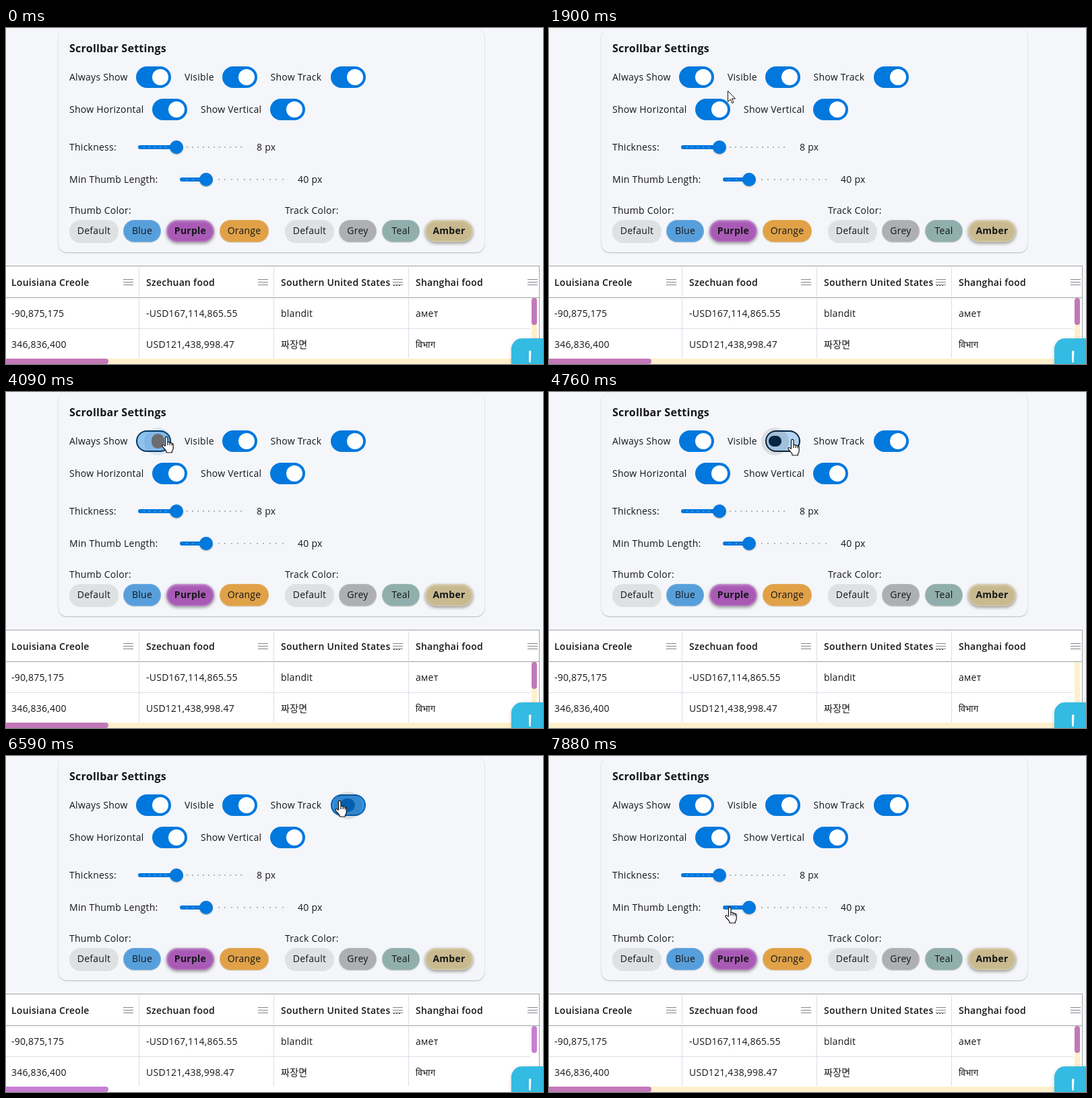
These frames come from a looping animation (797x499 px, 8 s). An HTML page:

```html
<!DOCTYPE html>
<html lang="en">
<head>
<meta charset="utf-8">
<title>Scrollbar settings</title>
<style>
html, body { margin: 0; width: 100%; height: 100%; overflow: hidden; }
body { background: #f4f6f9; }
#stage {
  position: absolute; left: 0; top: 0; width: 797px; height: 499px; overflow: hidden;
  background: #f4f6f9; color: #151618;
  font: 14px/20px "Open Sans", "Noto Sans", "Noto Sans CJK KR", "Noto Sans CJK", sans-serif;
  letter-spacing: .25px; white-space: pre;
}
#stage div, #stage span, #stage svg { position: absolute; box-sizing: border-box; }
#panel {
  left: 78px; top: 1px; width: 632px; height: 332px; border-radius: 12px;
  box-shadow: 0 1px 2px rgba(0,0,0,.24), 0 0 1px rgba(0,0,0,.08);
}
#stage .title { font-size: 16px; font-weight: 700; line-height: 24px; }
.head { font-weight: 600; }
.chip {
  top: 285px; height: 33px; border-radius: 16.5px; line-height: 32px; text-align: center;
  box-shadow: 0 1px 1px rgba(0,0,0,.14), inset 0 0 0 1px rgba(255,255,255,.16);
}
.chip.on {
  font-weight: 700;
  box-shadow: 0 2px 5px rgba(0,0,0,.4), inset 0 0 0 2px rgba(255,255,255,.16), inset 0 2px 4px rgba(255,255,255,.25);
}
.switch { width: 52px; height: 32px; }
.rail { inset: 0; border: 2px solid; border-radius: 16px; }
.halo { width: 41px; height: 41px; top: -4.5px; border-radius: 50%; }
.knob { border-radius: 12px; }
.fill { height: 6px; border-radius: 3px; background: #0078dd; }
.tick { width: 2px; height: 2px; border-radius: 1px; }
.ball {
  width: 20px; height: 20px; border-radius: 50%; background: #0078dd;
  box-shadow: 0 1px 2px rgba(0,0,0,.3);
}
.track { background: #fdf0cc; }
.thumb { background: #c278b8; border-radius: 4px; }
#help {
  left: 750px; top: 461px; width: 64px; height: 64px; border-radius: 16px;
  background: #33bbe3; box-shadow: 0 1px 4px rgba(0,0,0,.25);
}
#help div {
  left: 25.5px; top: 18px; width: 4px; height: 18px; background: #fff;
  border-radius: 2px; clip-path: polygon(0 0, 100% 0, 78% 100%, 22% 100%);
}
#flash {
  width: 25px; height: 25px; border-radius: 50%; background: #f0ec28; opacity: .85;
  mix-blend-mode: multiply;
}
#arrow, #hand { left: 0; top: 0; overflow: visible; }
#arrow path, #hand path { fill: #fff; stroke: #111; stroke-linejoin: round; }
</style>
</head>
<body>
<div id="stage"><div id="panel"></div></div>
<script>
const LOOP = 8000;
const stage = document.getElementById('stage');
const BLUE = [0, 120, 221], BLACK = [8, 8, 10], WHITE = [255, 255, 255], PAGE = [244, 246, 249];

function add(cls, css, text = '', parent = stage) {
  const el = document.createElement('div');
  el.className = cls;
  el.style.cssText = css;
  el.textContent = text;
  return parent.appendChild(el);
}
const box = (x, y, w, h) => `left:${x}px;top:${y}px;width:${w}px;height:${h}px;`;
const label = (text, x, mid, cls = '') => add(cls, `left:${x}px;top:${mid - 10}px`, text);

// Settings panel
label('Scrollbar Settings', 94, 28, 'title');
[['Always Show', 94, 73], ['Visible', 265, 73], ['Show Track', 392.6, 73],
 ['Show Horizontal', 94, 121], ['Show Vertical', 289, 121],
 ['Thickness:', 94, 177], ['8 px', 372, 177],
 ['Min Thumb Length:', 94, 225], ['40 px', 433, 225],
 ['Thumb Color:', 94, 271], ['Track Color:', 414, 271]].forEach(a => label(...a));

[['Default', 94, 73, '#dee1e1'], ['Blue', 174, 56, '#579fdb'],
 ['Purple', 238, 71, '#a85ab5', 1], ['Orange', 317, 73, '#e0a147'],
 ['Default', 414, 73, '#dee1e1'], ['Grey', 494, 56, '#aeafb1'],
 ['Teal', 558, 56, '#90aeac'], ['Amber', 622, 71, '#c8b98f', 1]].forEach(([text, x, w, color, on]) =>
  add(on ? 'chip on' : 'chip', `left:${x}px;width:${w}px;background:${color}`, text));

function slider(x, y, count, value) {
  const gap = 152 / count, ball = x + gap * value;
  add('fill', `left:${x - 1}px;top:${y - 3}px;width:${ball - x}px`);
  for (let i = 1; i <= count; i++)
    add('tick', `left:${x + i * gap - 1}px;top:${y - 1}px;background:${i < value ? '#5aa6e6' : '#9a9da3'}`);
  add('ball', `left:${ball - 10}px;top:${y - 10}px`);
}
slider(196.5, 177, 19, 7);
slider(258.5, 225, 16, 4);

// Data grid
const bar = (x, y, w, h, color) => add('', box(x, y, w, h) + 'background:' + color);
bar(0, 353, 792, 146, '#fff');
bar(0, 353, 792, 1, '#a0a2a8');
bar(791, 353, 1, 146, '#a0a2a8');
bar(0, 400, 791, 1, '#a0a2a8');
bar(0, 446, 778, 1, '#dcdde9');
for (const x of [197, 397, 597]) bar(x, 355, 1, 135, '#dcdde9');

const columns = [
  ['Louisiana Creole', '-90,875,175', '346,836,400'],
  ['Szechuan food', '-USD167,114,865.55', 'USD121,438,998.47'],
  ['Southern United States …', 'blandit', '짜장면'],
  ['Shanghai food', 'амет', 'विभाग']
];
columns.forEach(([head, a, b], i) => {
  const x = 8 + i * 200;
  label(head, x, 378, 'head');
  label(a, x, 424);
  label(b, x, 470);
  for (const y of [373, 377, 381]) bar(x + 165.5, y, 15.5, 1, '#85878c');
});

const tracks = [add('track', box(780, 401, 8, 89)), add('track', box(0, 491, 780, 8))];
const thumbs = [add('thumb', box(780, 401, 8, 40)), add('thumb', box(-8, 491, 160, 8))];

const help = add('', '');
help.id = 'help';
add('', '', '', help);

// Switches: position and the times they go off and on again
const switches = [[193, 57, 3320, 3950], [321, 57, 4620, 5300], [482, 57, 6500, 7330],
                  [217, 105], [392, 105]].map(([x, y, off = Infinity, on = Infinity]) => {
  const el = add('switch', `left:${x}px;top:${y}px`);
  const [rail, halo, knob] = ['rail', 'halo', 'knob'].map(c => add(c, '', '', el));
  return { x, y, off, on, rail, halo, knob };
});

const flash = add('', '');
flash.id = 'flash';
stage.insertAdjacentHTML('beforeend',
  `<svg id="arrow" width="14" height="21"><path d="M.5 .5V16.5L4.2 13 6.8 18.6 9 17.6 6.5 12H11.5Z"/></svg>
   <svg id="hand" width="20" height="26"><path stroke-width="1.2" d="M5.5 14V2.2a1.75 1.75 0 0 1 3.5 0V8.5q3-.8 3.2 1 2.8-.6 3 1 2-.3 2 1.5V17q0 3-1.8 5v2H7v-2Q5 19 1.5 15.5 0 13 2 12.5q1.5 0 3.5 2.5M9 8.5V13M12.2 9.5V13M15.2 10.5V13.5"/></svg>`);
const arrow = document.getElementById('arrow'), hand = document.getElementById('hand');

// Pointer: time, x, y
const path = [
  [660, 733, 484], [1010, 560, 240], [1220, 424, 123], [1360, 319, 110],
  [1560, 319, 110], [1900, 265, 93], [2170, 265, 93], [2850, 237, 67],
  [4090, 237, 67], [4480, 360, 71], [5420, 360, 71], [5905, 435, 73],
  [5980, 441, 73], [6260, 494, 67], [7330, 494, 67], [7880, 267, 225]
];
const presses = [[3260, 3330], [3880, 3950], [4540, 4620], [5230, 5300], [6460, 6530], [7200, 7330]];
// Screen updates: start, end, count
const bursts = [
  [660, 1360, 11], [1620, 1900, 5], [2230, 2850, 9], [3260, 3610, 6], [3880, 4620, 11],
  [4690, 4900, 4], [5230, 5980, 11], [6050, 6260, 4], [6460, 6870, 6], [7200, 7200, 1], [7330, 7880, 9]
];

const clamp = v => Math.min(1, Math.max(0, v));
const lerp = (a, b, p) => a + (b - a) * p;
const mix = (a, b, p) => `rgb(${a.map((v, i) => Math.round(lerp(v, b[i], p)))})`;
const backOut = p => 1 + 2.70158 * (p - 1) ** 3 + 1.70158 * (p - 1) ** 2;
const show = (el, on) => { el.style.visibility = on ? 'visible' : 'hidden'; };

function snap(t) {
  let last = 0;
  for (const [start, end, count] of bursts) {
    if (t < start) break;
    const step = (end - start) / (count - 1 || 1);
    last = t >= end ? end : start + Math.floor((t - start) / step) * step;
  }
  return last;
}

function pointer(t) {
  if (t < path[0][0]) return null;
  const i = path.findIndex(p => p[0] > t);
  if (i < 0) return path[path.length - 1].slice(1);
  const [a, b] = [path[i - 1], path[i]], p = (t - a[0]) / (b[0] - a[0]);
  return [lerp(a[1], b[1], p), lerp(a[2], b[2], p)];
}

const inside = (pos, x, y, w, h) =>
  !!pos && pos[0] >= x && pos[0] <= x + w && pos[1] >= y && pos[1] <= y + h;

function drawSwitch(s, t, hover, down) {
  const off = t >= s.off && t < s.on;
  const since = t >= s.on ? t - s.on : off ? t - s.off : Infinity;
  const p = clamp(since / 190), move = backOut(clamp(since / 300));
  const grow = hover && down ? 4 : 0;
  const size = span => {
    const q = clamp(since / span);
    return (off ? lerp(24, 16, q) : lerp(16, 24, q)) + grow;
  };
  const mid = off ? lerp(36, 16, move) : lerp(16, 36, move);
  const w = size(190), h = size(110), k = off ? p : 1 - p;
  s.rail.style.background = mix(BLUE, PAGE, k);
  s.rail.style.borderColor = mix(BLUE, BLACK, k);
  s.knob.style.cssText = box(mid - w / 2, 16 - h / 2, w, h) +
    `border-radius:14px;background:${off ? mix(BLUE, BLACK, p) : mix(BLACK, WHITE, p)}`;
  s.halo.style.left = mid - 20.5 + 'px';
  s.halo.style.background = off ? 'rgba(20,20,24,.11)' : 'rgba(0,80,160,.1)';
  show(s.halo, hover);
}

function draw(now) {
  const t = snap(now % LOOP), pos = pointer(t);
  const down = presses.some(([a, b]) => t >= a && t < b);
  let link = inside(pos, 196, 167, 154, 20) || inside(pos, 258, 215, 154, 20);
  for (const s of switches) {
    const hover = inside(pos, s.x, s.y, 52, 32);
    link = link || hover;
    drawSwitch(s, t, hover, down);
  }
  const [, visible, track] = switches;
  const bare = t >= track.off && t < track.on;
  tracks.forEach(el => show(el, !bare));
  thumbs.forEach(el => {
    show(el, t < visible.off || t >= visible.on);
    el.style.background = bare ? '#c77fd4' : '#c278b8';
  });
  show(arrow, pos && !link);
  show(hand, pos && link);
  show(flash, down);
  if (pos) {
    const [x, y] = pos.map(Math.round);
    arrow.style.transform = `translate(${x}px,${y}px)`;
    hand.style.transform = `translate(${x - 6}px,${y - 1}px)`;
    flash.style.left = x - 12 + 'px';
    flash.style.top = y - 13 + 'px';
  }
}

let origin;
function tick(now) {
  origin ??= now;
  draw(now - origin);
  requestAnimationFrame(tick);
}
draw(0);
requestAnimationFrame(tick);
</script>
</body>
</html>
```
